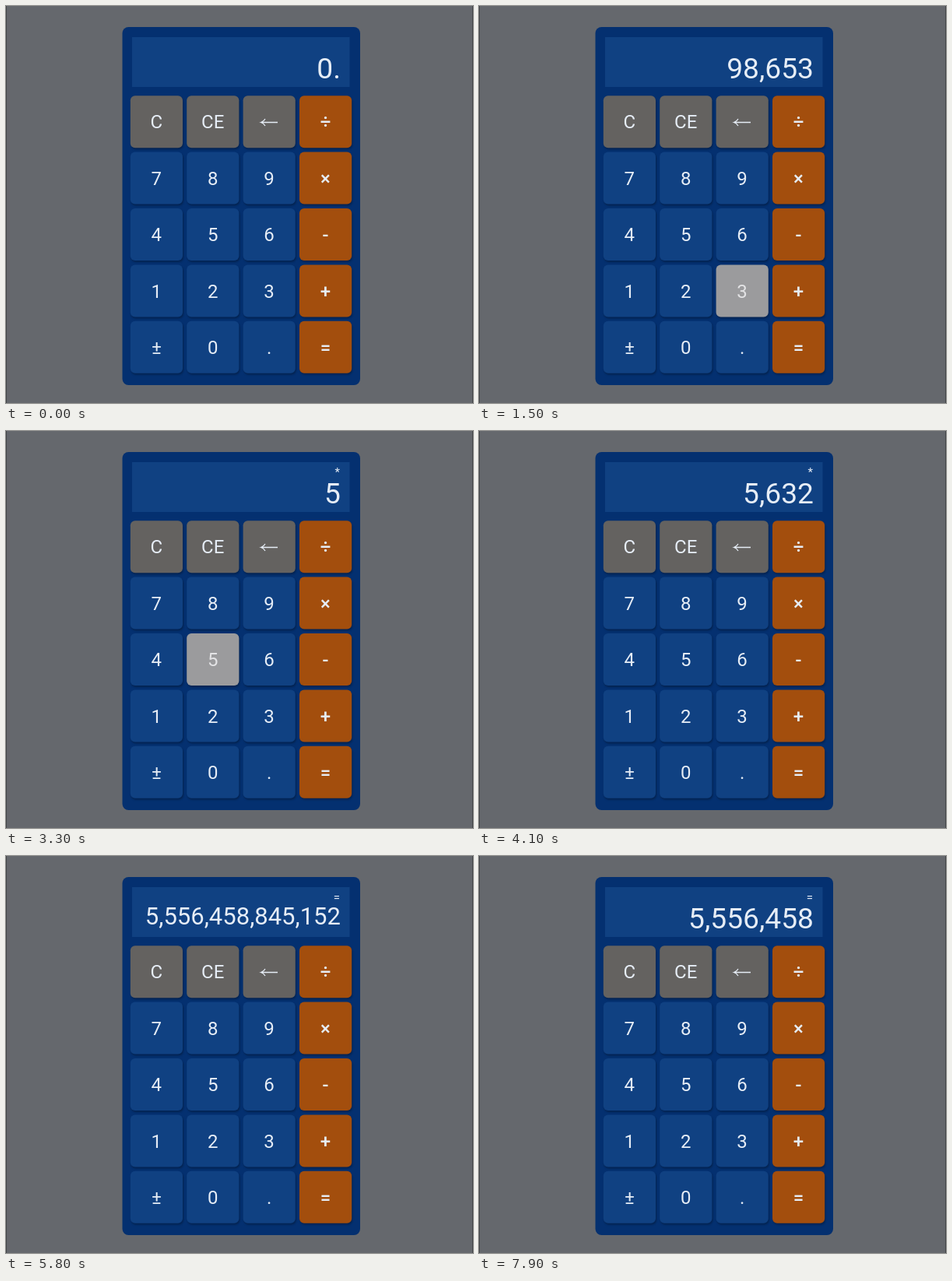
Animation of 600 by 510 pixels, one loop 8000 ms. Source, as an HTML page:

```html
<!DOCTYPE html>
<html lang="en">
<head>
<meta charset="utf-8">
<title>Calculator</title>
<style>
  html, body { margin: 0; width: 100%; height: 100%; overflow: hidden; background: #65686d; }
  svg { display: block; width: 600px; height: 510px; font-family: Roboto, Arial, sans-serif; fill: #e6edf6; }
  .key { filter: drop-shadow(1px 2px 1px rgba(0, 0, 0, .28)); }
  .key text { font-size: 24px; text-anchor: middle; }
  .num rect { fill: #104182; }
  .edit rect { fill: #646260; }
  .op rect { fill: #a34e0d; }
  .op text { font-weight: 500; }
  .key.down rect { fill: #9b9b9d; }
  .key.down text { fill: #e3e3e5; }
  .out { text-anchor: end; }
</style>
</head>
<body>
<svg id="stage" viewBox="0 0 600 510">
  <rect width="600" height="510" fill="#65686d"/>
  <path d="M.5 0V510M599.5 0V510" stroke="#424447"/>
  <rect x="149.5" y="27" width="305.5" height="460" rx="8" fill="#043070"/>
  <rect x="162" y="40" width="279.5" height="64" fill="#104182"/>
  <text id="sign" class="out" x="429" y="58" font-size="15"></text>
  <text id="value" class="out" x="430"></text>
</svg>
<script>
const LOOP = 8000, HOLD = 200;
const ROWS = [
  ['C', 'CE', '←', '÷'],
  ['7', '8', '9', '×'],
  ['4', '5', '6', '-'],
  ['1', '2', '3', '+'],
  ['±', '0', '.', '=']
];
// time in ms, key
const PRESSES = [
  [300, '9'], [600, '8'], [900, '6'], [1200, '5'], [1500, '3'], [1800, '1'], [2100, '1'],
  [2900, '×'], [3300, '5'], [3500, '6'], [3600, '3'], [3800, '2'], [4200, '3'], [4500, '2'],
  [4900, '='],
  [6900, '←'], [7200, '←'], [7400, '←'], [7500, '←'], [7700, '←'], [7900, '←']
];

const stage = document.getElementById('stage');
const sign = document.getElementById('sign');
const value = document.getElementById('value');
const keys = {};

function add(parent, tag, attrs) {
  const el = document.createElementNS('http://www.w3.org/2000/svg', tag);
  for (const name in attrs) el.setAttribute(name, attrs[name]);
  return parent.appendChild(el);
}

ROWS.forEach((row, r) => row.forEach((label, c) => {
  const x = 159.8 + c * 72.4, y = 115.2 + r * 72.4;
  const kind = c === 3 ? 'op' : r === 0 ? 'edit' : 'num';
  const key = keys[label] = add(stage, 'g', { class: 'key ' + kind });
  add(key, 'rect', { x, y, width: 67.2, height: 67, rx: 6 });
  if (label === '←') {
    add(key, 'path', {
      d: 'M349 149.5H328M333 145Q331 148.5 327.5 149.5Q331 150.5 333 154',
      fill: 'none', stroke: '#e6edf6', 'stroke-width': 1.3
    });
  } else {
    add(key, 'text', { x: x + 33.5, y: y + 42.2 }).textContent = label;
  }
}));

function stateAt(t) {
  let entry = '', first = 0, op = '', fresh = false, down = '';
  for (const [at, key] of PRESSES) {
    if (at > t) break;
    if (key === '×') {
      first = Number(entry);
      op = '*';
      fresh = true;
    } else if (key === '=') {
      entry = String(first * Number(entry));
      op = '=';
    } else if (key === '←') {
      entry = entry.slice(0, -1);
    } else {
      entry = fresh ? key : entry + key;
      fresh = false;
    }
    down = key !== '←' && t < at + HOLD ? key : '';
  }
  return { text: entry ? Number(entry).toLocaleString('en-US') : '0.', op, down };
}

function draw(t) {
  const { text, op, down } = stateAt(t);
  // long numbers shrink with each extra character
  const size = 37.2 - 0.77 * Math.max(0, text.length - 9);
  value.textContent = text;
  value.setAttribute('font-size', size);
  value.setAttribute('y', 88 + 0.87 * (size - 31));
  sign.textContent = op;
  for (const label in keys) keys[label].classList.toggle('down', label === down);
}

const start = performance.now();
function tick() {
  draw((performance.now() - start) % LOOP);
  requestAnimationFrame(tick);
}
tick();
</script>
</body>
</html>
```
